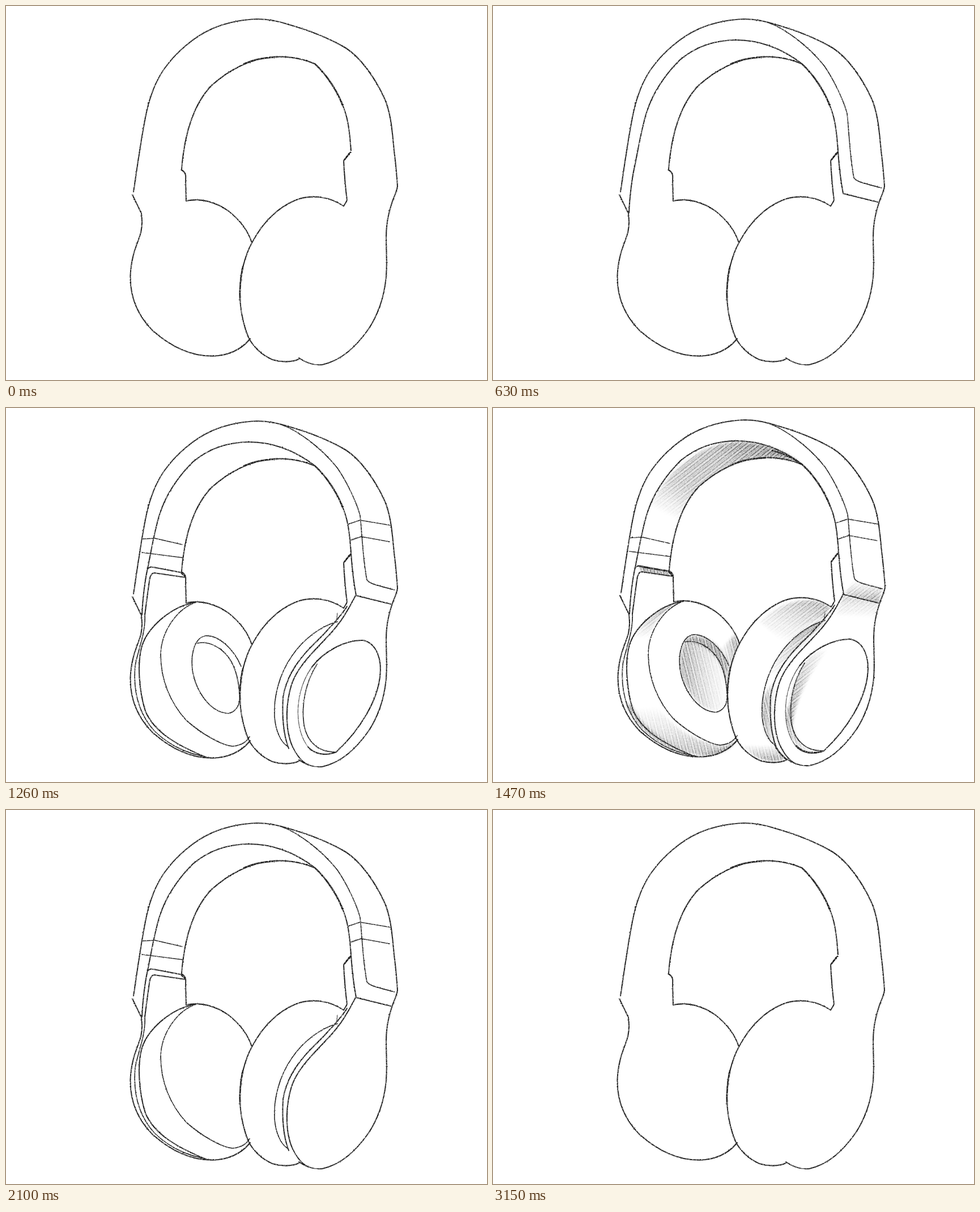
Write an HTML page without scripts that moves like this. It is 849 px wide and 660 px high and loops after 3.36 s.

```html
<!DOCTYPE html>
<html lang="en">
<head>
<meta charset="utf-8">
<title>Headphones sketch</title>
<style>
  html, body { margin: 0; width: 100%; height: 100%; overflow: hidden; background: #fff; }
  svg { display: block; width: 100vw; height: 100vh; }

  .lines { fill: none; stroke: #1c1c1c; stroke-width: 2.1; stroke-linecap: round; stroke-linejoin: round; }
  .thin { stroke-width: 1.7; }
  .soft { stroke-width: 1.4; stroke: #555; }
  .bold { stroke-width: 2.7; }

  /* Stages appear one by one, then leave in reverse order */
  .stage { animation: 3360ms step-end infinite; }
  .edge   { animation-name: edge; }
  .back   { animation-name: back; }
  .joint  { animation-name: joint; }
  .pads   { animation-name: pads; }
  .detail { animation-name: detail; }
  .disc   { animation-name: disc; }
  .shade  { animation-name: shade; }
  .sheet  { animation: nudge 3360ms step-end infinite; }

  @keyframes edge   { 0%, 93.75% { opacity: 0 } 6.25%  { opacity: 1 } }
  @keyframes back   { 0%, 87.5%  { opacity: 0 } 12.5%  { opacity: 1 } }
  @keyframes joint  { 0%, 81.25% { opacity: 0 } 18.75% { opacity: 1 } }
  @keyframes pads   { 0%, 75%    { opacity: 0 } 25%    { opacity: 1 } }
  @keyframes detail { 0%, 68.75% { opacity: 0 } 31.25% { opacity: 1 } }
  @keyframes disc   { 0%, 62.5%  { opacity: 0 } 37.5%  { opacity: 1 } }
  @keyframes shade  { 0%, 56.25% { opacity: 0 } 43.75% { opacity: 1 } }
  @keyframes nudge  { 0%, 56.25% { transform: none } 43.75% { transform: translate(1px, -2px) } }
</style>
</head>
<body>
<svg viewBox="0 0 849 660" preserveAspectRatio="none">
  <defs>
    <filter id="pencil" filterUnits="userSpaceOnUse" x="0" y="0" width="849" height="660" color-interpolation-filters="sRGB">
      <feTurbulence type="fractalNoise" baseFrequency=".4" numOctaves="2" seed="4" result="noise"/>
      <feDisplacementMap in="SourceGraphic" in2="noise" scale="2" xChannelSelector="R" yChannelSelector="G" result="rough"/>
      <feColorMatrix in="noise" values="0 0 0 0 0  0 0 0 0 0  0 0 0 0 0  0 0 0 -1.6 1.7" result="grain"/>
      <feComposite in="rough" in2="grain" operator="in"/>
    </filter>
    <filter id="blur"><feGaussianBlur stdDeviation="2"/></filter>

    <pattern id="hatch" width="11" height="60" patternUnits="userSpaceOnUse">
      <path d="M1,0V60M7,0V60" stroke="#fff" stroke-width="1.3"/>
      <path d="M4,0V60" stroke="#bbb" stroke-width=".9"/>
    </pattern>
    <pattern id="hatchSteep" href="#hatch" patternTransform="rotate(-14)"/>
    <pattern id="hatchSlant" href="#hatch" patternTransform="rotate(52)"/>
    <mask id="steep" maskUnits="userSpaceOnUse" x="0" y="0" width="849" height="660">
      <path fill="#444" d="M0,0H849V660H0z"/><path fill="url(#hatchSteep)" d="M0,0H849V660H0z"/>
    </mask>
    <mask id="slant" maskUnits="userSpaceOnUse" x="0" y="0" width="849" height="660">
      <path fill="#444" d="M0,0H849V660H0z"/><path fill="url(#hatchSlant)" d="M0,0H849V660H0z"/>
    </mask>

    <linearGradient id="fromLeft">
      <stop stop-color="#222" stop-opacity=".9"/><stop offset=".45" stop-color="#222" stop-opacity=".4"/>
      <stop offset="1" stop-color="#222" stop-opacity="0"/>
    </linearGradient>
    <linearGradient id="fromTop" href="#fromLeft" x2="0" y2="1"/>
    <linearGradient id="fromBottom" href="#fromLeft" x2="0" y1="1" y2="0"/>
    <linearGradient id="fromRight" href="#fromLeft" x1="1" x2="0"/>
    <linearGradient id="fromCorner" href="#fromLeft" x1=".9" x2=".3" y1="0" y2=".9"/>
    <linearGradient id="bandTone" x1="0" y1="1" x2="1" y2="0">
      <stop offset=".1" stop-color="#222" stop-opacity="0"/><stop offset=".35" stop-color="#222" stop-opacity=".5"/>
      <stop offset=".65" stop-color="#222" stop-opacity=".6"/><stop offset=".85" stop-color="#222"/>
    </linearGradient>
  </defs>

  <g filter="url(#pencil)">
    <g class="sheet">
      <g class="stage shade">
        <g mask="url(#slant)">
          <g filter="url(#blur)">
            <!-- band lining -->
            <path fill="url(#bandTone)" d="M270,194C286,140 350,63 430,62C475,62 515,77 540,98C515,90 490,88 470,90C430,93 390,115 362,141C345,158 335,175 327,200z"/>
            <!-- left pad, top -->
            <path fill="url(#fromTop)" d="M330,346C295,350 260,380 246,408L274,404C282,380 300,356 330,346z"/>
            <!-- right cup, top and rim -->
            <path fill="url(#fromCorner)" d="M470,380C515,336 565,334 594,353L584,372C560,378 540,390 515,420C505,410 490,395 470,380z" opacity=".8"/>
            <path fill="url(#fromTop)" d="M586,376C545,384 500,430 486,475L503,465C520,440 560,405 586,376z"/>
            <!-- joint -->
            <path fill="url(#fromBottom)" d="M637,307L687,321L679,346L619,331z"/>
            <path fill="url(#fromTop)" d="M617,332L680,347L674,372C650,368 630,368 604,368z" opacity=".5"/>
            <!-- disc -->
            <path fill="url(#fromLeft)" d="M549,452C520,500 520,540 527,565C530,530 548,480 590,428C570,432 560,440 549,452z" opacity=".8"/>
          </g>
        </g>
        <g mask="url(#steep)">
          <g filter="url(#blur)">
            <!-- ear opening -->
            <path fill="url(#fromLeft)" d="M338,415C360,410 385,425 398,448C407,465 411,490 410,520C404,537 385,541 365,525C335,500 320,450 338,415z" opacity=".85"/>
            <path fill="#222" fill-opacity=".8" d="M338,413C345,402 362,402 380,411C400,422 408,440 413,456L412,490C405,455 390,420 338,413z"/>
            <path fill="url(#fromRight)" d="M425,402L433,418C424,440 417,460 415,478C412,455 407,440 400,430z"/>
            <!-- left pad, bottom -->
            <path fill="url(#fromBottom)" d="M247,535C270,580 320,612 375,616C405,612 423,600 430,586C420,596 405,599 390,596C350,588 310,560 290,530z" opacity=".7"/>
            <path fill="#222" fill-opacity=".8" d="M365,615C395,617 418,605 429,588C415,602 390,607 365,615z"/>
            <path fill="#222" fill-opacity=".6" d="M232,520C250,570 300,606 350,616C300,590 262,565 245,528z"/>
            <!-- strap -->
            <path fill="#222" fill-opacity=".8" d="M256,281L310,290L317,299L262,291z"/>
            <!-- right cup, bottom -->
            <path fill="url(#fromBottom)" d="M440,596C460,624 490,630 515,621L497,597C480,600 460,600 440,596z"/>
            <path fill="url(#fromLeft)" d="M476,520C472,560 480,590 500,600C488,560 490,520 498,485C490,490 480,500 476,520z"/>
            <path fill="url(#fromLeft)" d="M516,540C518,590 545,616 575,611C540,605 524,580 524,520z" opacity=".8"/>
          </g>
        </g>
        <g class="lines bold">
          <path d="M492,77C515,83 530,91 544,101"/>
          <path d="M258,282L309,290L316,298"/>
          <path d="M497,597C501,607 508,615 517,622"/>
          <path d="M534,598C546,610 560,613 580,608"/>
        </g>
      </g>

      <g class="lines">
        <!-- silhouette -->
        <path d="M225,328C232,282 239,230 247,192C253,163 262,135 280,110C300,82 331,55 362,41C389,29 415,24 443,23C465,23 482,27 500,33C528,41 565,54 598,73C626,90 652,128 668,163C680,190 682,225 685,255C688,280 690,300 691,318"/>
        <path d="M691,318C690,328 684,338 681,348C674,368 671,388 671,408C671,430 673,450 671,478C668,510 659,541 640,570C615,605 590,626 558,633C540,635 527,628 517,621"/>
        <path d="M517,623C505,629 485,629 470,624C450,615 437,602 428,585C418,560 412,530 413,500C414,470 422,440 434,418C452,384 478,357 510,343C540,331 572,337 596,353L602,343C599,320 597,295 596,273L608,258"/>
        <path d="M609,255C607,230 605,205 598,185C588,155 565,120 545,102C520,91 490,88 470,90C432,93 394,112 362,141C330,175 315,225 310,288"/>
        <path d="M309,289C316,292 318,298 317,305L318,344C345,338 372,347 393,362C412,377 427,396 434,418"/>
        <path d="M431,587C421,600 402,614 375,617C335,621 295,605 258,572C228,541 217,505 220,467C223,435 233,417 238,400C241,385 240,378 239,366L223,333"/>
        <g class="bold">
          <path d="M420,102C440,94 455,91 480,90"/>
          <path d="M545,102C565,120 584,148 594,175"/>
          <path d="M597,272L606,260"/>
          <path d="M413,520C412,500 414,480 418,460"/>
        </g>

        <path class="stage edge" d="M240,365C241,340 245,305 250,283C256,255 262,215 272,185C282,155 300,125 330,95C360,70 395,60 430,60C470,60 510,75 544,101"/>
        <path class="stage back thin" d="M481,28C510,36 555,68 585,106C604,134 620,170 625,190C628,215 630,270 637,303C640,309 650,312 686,321"/>
        <path class="stage joint" d="M609,257C611,285 614,310 618,331L679,346"/>

        <g class="stage pads">
          <path d="M335,343C290,350 250,388 240,420C231,450 235,500 246,535C262,572 300,594 350,615"/>
          <path class="thin" d="M330,345C300,358 274,395 273,435C273,480 290,520 318,551C345,575 380,595 400,597C418,595 425,588 430,580"/>
          <path class="thin" d="M585,377C555,385 525,408 505,437C482,470 472,510 474,545C476,570 485,590 497,597"/>
          <path class="soft" d="M585,362L583,378"/>
        </g>

        <g class="stage detail">
          <path class="thin" d="M241,231L263,230L311,241M240,255L311,264M604,205L625,198L679,207M609,233L627,227L677,236"/>
          <path d="M250,284C252,281 255,280 260,281L308,290L317,299L262,291C256,291 254,297 253,305L245,365"/>
          <path class="thin" d="M245,365C247,397 232,430 228,455C224,500 235,540 262,570C295,602 330,612 360,617"/>
          <path d="M602,350C592,366 565,396 540,420C512,448 494,478 489,510C487,545 489,575 499,601"/>
          <path d="M617,331C607,350 594,376 569,402C544,429 515,455 504,488C494,520 493,560 502,588C508,606 520,624 534,630"/>
        </g>

        <g class="stage disc">
          <path class="thin" d="M415,456C402,425 375,400 352,402C332,406 326,435 329,462C335,500 360,537 392,539C405,537 412,525 412,515"/>
          <path class="thin" d="M338,415C360,410 385,425 398,448C407,465 411,485 412,505"/>
          <path d="M540,457C562,428 600,409 630,410C655,415 664,445 660,475C655,515 628,565 583,607C566,614 545,612 533,598"/>
          <path class="soft" d="M540,457C520,485 513,520 516,550C518,570 524,586 533,598"/>
          <path class="thin" d="M549,452C528,485 521,525 526,560C532,590 552,608 582,607"/>
        </g>
      </g>
    </g>
  </g>
</svg>
</body>
</html>
```
